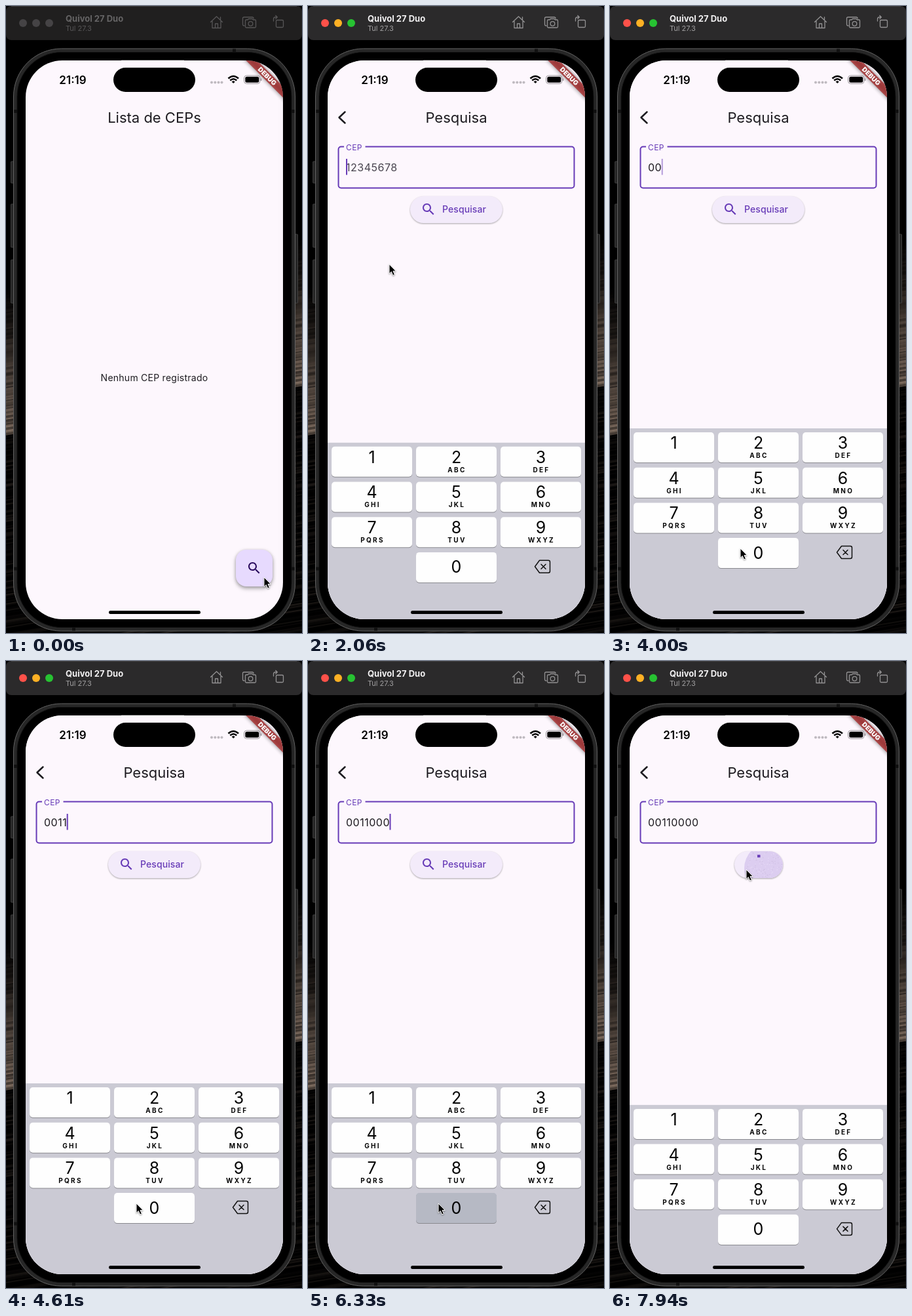
These frames come from a looping animation (452x956 px, 8000 ms). An HTML page:

```html
<!DOCTYPE html>
<html lang="pt">
<head>
<meta charset="utf-8">
<title>Pesquisa de CEP</title>
<style>
html, body { margin: 0; width: 100%; height: 100%; overflow: hidden; background: #000; }
svg { display: block; width: 100vw; height: 100vh; font-family: Inter, Roboto, sans-serif; }
.mid { text-anchor: middle; }
.title { font-size: 22px; fill: #1d1b20; }
.line { fill: none; stroke-linecap: round; stroke-linejoin: round; }
.bar { fill: #201f1f; }
.dot { fill: #454345; }
.name { fill: #656465; font-size: 13px; font-weight: 700; }
.sub { fill: #565556; font-size: 11px; }
.tools { stroke: #565556; stroke-width: 1.3; }
.active .bar { fill: #2b2a2b; }
.active .dot { fill: var(--on); }
.active .name { fill: #f2f1f2; }
.active .sub { fill: #a09fa0; }
.active .tools { stroke: #929192; }
.field { font-size: 16px; letter-spacing: .5px; }
.digit { font-size: 25px; fill: #050505; }
.letters { font-size: 10px; font-weight: 700; letter-spacing: 2.3px; fill: #050505; }
.raised { filter: drop-shadow(0 1px 1px #0005); }
.fab { filter: drop-shadow(0 3px 3px #0004) drop-shadow(0 1px 2px #0003); }
</style>
</head>
<body>
<svg viewBox="0 0 452 956" preserveAspectRatio="none">
  <defs>
    <clipPath id="screen"><rect x="30" y="83" width="393" height="852" rx="56"/></clipPath>
    <clipPath id="pill"><rect id="pillShape" y="290" height="41" rx="20.5"/></clipPath>
    <path id="lens" d="M15.5 14h-.79l-.28-.27C15.41 12.59 16 11.11 16 9.5 16 5.91 13.09 3 9.5 3S3 5.91 3 9.5 5.91 16 9.5 16c1.61 0 3.09-.59 4.23-1.57l.27.28v.79l5 4.99L20.49 19l-4.99-5zm-6 0C7.01 14 5 11.99 5 9.5S7.01 5 9.5 5 14 7.01 14 9.5 11.99 14 9.5 14z"/>
  </defs>

  <rect width="452" height="956"/>
  <g id="wallpaper" stroke-width="2.4"></g>

  <g id="window">
    <rect width="452" height="52" fill="#000"/>
    <rect class="bar" width="452" height="52" rx="8"/>
    <path d="M8 .5H444" stroke="#484748" opacity=".7"/>
    <circle class="dot" cx="26" cy="26" r="6" style="--on:#fe5149"/>
    <circle class="dot" cx="46" cy="26" r="6" style="--on:#fdb024"/>
    <circle class="dot" cx="66" cy="26" r="6" style="--on:#27c232"/>
    <text class="name" x="91" y="24">Quivol 27 Duo</text>
    <text class="sub" x="91" y="38">Tul 27.3</text>
    <g class="line tools">
      <path d="M312.5 24.5L321.5 16L330.5 24.5M315 23V33.500H328V23M327.500 17V21M319.500 33V27H323.500V33"/>
      <path d="M364 30H363Q361.500 30 361.500 28V19Q361.500 17 363.500 17H376Q378 17 378 19"/>
      <path d="M367 21H369L370.500 19.500H376L377.500 21H380Q381.500 21 381.500 22.500V31.500Q381.500 33 380 33H367Q365.500 33 365.500 31.500V22.500Q365.500 21 367 21Z"/>
      <circle cx="373.500" cy="27" r="3.300"/>
      <rect x="412.500" y="21.500" width="11" height="11" rx="1.500"/>
      <path d="M408.500 23V20Q408.500 17 411.500 17H414M411.800 14.500L414.300 17L411.800 19.500"/>
    </g>
  </g>

  <g fill="#252525" stroke="#484848" stroke-width=".8">
    <rect x="7.500" y="237" width="6" height="33" rx="1"/>
    <rect x="7.500" y="302" width="6" height="66" rx="1"/>
    <rect x="7.500" y="387" width="6" height="66" rx="1"/>
    <rect x="439.500" y="348" width="6" height="105" rx="1"/>
  </g>
  <rect x="11.500" y="65" width="430" height="888" rx="73" fill="#272727" stroke="#626262"/>
  <path d="M12 160.500H18M435 160.500H441M12 858H18M435 858H441M348.500 65.500V71M103.500 947V952.500" stroke="#111" stroke-width="5"/>
  <rect x="17" y="70.500" width="419" height="877" rx="68" fill="#000" stroke="#111"/>
  <path d="M176 82.500H272" stroke="#555"/>

  <g clip-path="url(#screen)">
    <rect x="30" y="83" width="393" height="852" fill="#fdf7fd"/>

    <g id="listPage">
      <text class="title mid" x="226.500" y="178">Lista de CEPs</text>
      <text class="mid" x="226.500" y="572" font-size="14" letter-spacing=".25" fill="#1d1b20">Nenhum CEP registrado</text>
      <rect class="fab" x="351" y="829" width="56" height="56" rx="16" fill="#e7dafe"/>
      <use href="#lens" x="367" y="845" fill="#2a0a5e"/>
    </g>

    <g id="searchPage">
      <rect x="30" y="83" width="393" height="852" fill="#fdf7fd" style="filter:drop-shadow(-3px 0 6px #0002)"/>
      <path class="line" d="M56.500 161.500L47.500 170L56.500 178.500" stroke="#1d1b20" stroke-width="2.500"/>
      <text class="title mid" x="226.500" y="178">Pesquisa</text>
      <rect id="border" x="46.500" y="214.500" width="360" height="63" rx="4" fill="none"/>
      <rect id="gap" x="55" y="211" height="7" fill="#fdf7fd"/>
      <text id="label" class="field">CEP</text>
      <text id="hint" class="field" x="58" y="252" fill="#49454f">12345678</text>
      <text id="typed" class="field" x="58" y="252" fill="#1d1b20"></text>
      <rect id="caret" y="233" width="2" height="24.500" fill="#673bb7"/>

      <g class="raised"><g clip-path="url(#pill)">
        <rect x="150" y="290" width="152" height="41" fill="#f3ebfa"/>
        <g id="ripple" fill="#dccdf0"><circle/></g>
      </g></g>
      <g id="buttonLabel" fill="#673bb7">
        <use href="#lens" x="172" y="298"/>
        <text x="205" y="315" font-size="14" font-weight="500" letter-spacing=".1">Pesquisar</text>
      </g>
      <rect id="spinner" x="225" y="295.500" width="4.500" height="4" rx=".5" fill="#673bb7"/>
    </g>

    <g id="keyboard">
      <rect x="30" y="644" width="393" height="330" fill="#cbcad4"/>
      <g id="keys"></g>
      <path class="line" d="M353.500 823.500H367Q369.500 823.500 369.500 826V840Q369.500 842.500 367 842.500H353.500L346.500 833ZM356 829.500L363 836.500M363 829.500L356 836.500" stroke="#111" stroke-width="1.500"/>
    </g>

    <text class="mid" x="102" y="118.500" font-size="17" font-weight="600">21:19</text>
    <rect x="164" y="94" width="125" height="37" rx="18.500"/>
    <g fill="#bfbac0">
      <circle cx="314" cy="116.500" r="2"/><circle cx="319.300" cy="116.500" r="2"/>
      <circle cx="324.500" cy="116.500" r="2"/><circle cx="329.500" cy="116.500" r="2"/>
    </g>
    <g fill="none" stroke="#000" stroke-width="2.600">
      <path d="M339.500 110.500Q347.200 103.500 355 110.500M342.300 113.500Q347.200 109 352.200 113.500"/>
      <path d="M347.200 117.500L345.200 115.500Q347.200 113.800 349.200 115.500Z" fill="#000" stroke-width="1"/>
    </g>
    <rect x="363.500" y="106" width="24.500" height="12.500" rx="4" fill="none" stroke="#9b969b"/>
    <rect x="365.300" y="107.800" width="21" height="9" rx="2.500"/>
    <path d="M389.500 110.500V114" stroke="#9b969b" stroke-width="1.500"/>
    <rect x="157" y="922" width="140" height="5" rx="2.500"/>

    <g transform="translate(423 83) rotate(45)">
      <rect x="-60" y="28" width="120" height="12" fill="#000" opacity=".5" style="filter:blur(3px)"/>
      <rect x="-60" y="28" width="120" height="12" fill="#000" opacity=".15"/>
      <rect x="-60" y="28" width="120" height="12" fill="#b71c1c" opacity=".63"/>
      <text class="mid" x="0" y="37.600" font-size="10" font-weight="900" fill="#fff">DEBUG</text>
    </g>
  </g>

  <path id="pointer" d="M0 0V14.500L3.300 11.500L5.700 17L8.400 15.800L6 10.500H10.300Z" fill="#000" stroke="#fff" stroke-width="1" style="filter:drop-shadow(0 1px 1px #0006)"/>
</svg>

<script>
const LOOP = 8000;
const ENTRY = '00110000';
const PRESSES = [2640, 3400, 4060, 4350, 5230, 6050, 6320, 6660];
const FOCUS = 1780, SUBMIT = 7720, LOADING = 7900;

// Pointer stops: time, x, y
const STOPS = [
  [0, 394, 871], [400, 394, 871], [1390, 99, 250], [1850, 99, 250],
  [2500, 200, 830], [2650, 200, 830], [3300, 110, 672], [3500, 110, 672],
  [3900, 199, 827], [4650, 199, 827], [5100, 125, 679], [5450, 125, 679],
  [5950, 199, 827], [6760, 199, 827], [7363, 200, 320], [7600, 208, 318], [LOOP, 208, 318]
];

const $ = id => document.getElementById(id);
const set = (el, attrs) => { for (const k in attrs) el.setAttribute(k, attrs[k]); };
const ramp = (t, from, duration) => Math.min(1, Math.max(0, (t - from) / duration));
const smooth = p => p * p * (3 - 2 * p);
const easeOut = p => 1 - (1 - p) ** 4;
const mix = (a, b, p) => a + (b - a) * p;

let seed = 7;
const random = () => (seed = seed * 16807 % 2147483647) / 2147483647;

function buildWallpaper() {
  let lines = '';
  for (let y = 0; y < 1040; y += 2) {
    const glow = y < 430 || y > 655 ? 0 : (y - 430) / 225;
    const light = glow * 46 * (.45 + .55 * random()) + (y > 655 ? 10 * random() ** 3 : 0);
    lines += `<path d="M0 ${y}L452 ${y - 75}" stroke="hsl(25 14% ${light.toFixed(1)}%)"/>`;
  }
  $('wallpaper').innerHTML = lines;
}

const keys = [];
function buildKeys() {
  const letters = ['', 'ABC', 'DEF', 'GHI', 'JKL', 'MNO', 'PQRS', 'TUV', 'WXYZ'];
  let html = '';
  for (let i = 0; i < 10; i++) {
    const x = 36 + (i === 9 ? 1 : i % 3) * 129;
    const y = 650 + Math.floor(i / 3) * 53.7;
    const cx = x + 61.5;
    keys.push({ x, y });
    html += `<rect x="${x}" y="${y + 1}" width="123" height="46" rx="5" fill="#89898f"/>
      <rect class="cap" x="${x}" y="${y}" width="123" height="46" rx="5"/>
      <text class="digit mid" x="${cx}" y="${y + (i === 9 ? 31.5 : 25)}">${(i + 1) % 10}</text>
      <text class="letters mid" x="${cx + 1}" y="${y + 39}">${letters[i] || ''}</text>`;
  }
  $('keys').innerHTML = html;
}

function buildRipple() {
  let specks = '';
  for (let i = 0; i < 260; i++) {
    const r = 37 * Math.sqrt(random()), a = random() * 2 * Math.PI;
    const shade = random() < .5 ? '#cfc0e2' : '#e6daf5';
    specks += `<rect x="${(r * Math.cos(a)).toFixed(1)}" y="${(r * Math.sin(a)).toFixed(1)}" width="1.2" height="1.2" fill="${shade}"/>`;
  }
  $('ripple').innerHTML = '<circle r="38"/>' + specks;
}

function pointerAt(t) {
  const i = STOPS.findIndex(stop => stop[0] > t);
  const [t0, x0, y0] = STOPS[i - 1], [t1, x1, y1] = STOPS[i];
  const p = smooth((t - t0) / (t1 - t0));
  return [mix(x0, x1, p), mix(y0, y1, p)];
}

function drawField(t) {
  const focused = t >= FOCUS;
  const float = smooth(ramp(t, FOCUS, 167));
  const purple = '#673bb7';
  set($('border'), { stroke: focused ? purple : '#7b747e', 'stroke-width': focused ? 2 : 1 });
  set($('gap'), { width: 32.5 * float });
  set($('label'), {
    transform: `translate(58 ${mix(252, 220, float)}) scale(${mix(1, .75, float)})`,
    fill: focused ? purple : '#49454f'
  });
  set($('hint'), { opacity: float * (1 - ramp(t, PRESSES[0], 240)) });

  const count = PRESSES.filter(time => time <= t).length;
  const typed = $('typed');
  typed.textContent = ENTRY.slice(0, count);
  const phase = (t - (PRESSES[count - 1] || FOCUS)) % 1000;
  const blink = 1 - ramp(phase, 500, 200) + ramp(phase, 900, 100);
  set($('caret'), {
    x: 58 + (count ? typed.getComputedTextLength() - .5 : 0),
    opacity: focused && t < SUBMIT + 60 ? blink : 0
  });
}

function drawButton(t) {
  const loading = t >= LOADING;
  set($('pillShape'), { x: loading ? 190 : 156, width: loading ? 74 : 141 });
  set($('buttonLabel'), { opacity: loading ? 0 : 1 });
  set($('spinner'), { opacity: loading ? 1 : 0 });
  const grow = ramp(t, SUBMIT, 220);
  set($('ripple'), {
    transform: `translate(${loading ? 243 : 209} 316) scale(${grow})`,
    opacity: Math.min(1, grow * 2)
  });
}

function drawKeyboard(t) {
  const rise = easeOut(ramp(t, FOCUS + 80, 420));
  const fall = smooth(ramp(t, 7860, 390));
  set($('keyboard'), { transform: `translate(0 ${295 * (1 - rise + fall)})` });

  const press = PRESSES.find(time => t >= time && t < time + 130);
  const [px, py] = press ? pointerAt(press) : [0, 0];
  document.querySelectorAll('.cap').forEach((cap, i) => {
    const { x, y } = keys[i];
    const hit = px > x && px < x + 123 && py > y && py < y + 46;
    set(cap, { fill: hit ? '#b6b9c4' : '#fefefe' });
  });
}

function draw(t) {
  set($('window'), { class: t >= 60 ? 'active' : '' });
  const push = easeOut(ramp(t, 150, 520));
  set($('listPage'), { transform: `translate(${-131 * push} 0)` });
  set($('searchPage'), { transform: `translate(${400 * (1 - push)} 0)` });
  drawField(t);
  drawButton(t);
  drawKeyboard(t);
  set($('pointer'), { transform: `translate(${pointerAt(t)})` });
}

buildWallpaper();
buildKeys();
buildRipple();
const start = performance.now();
function tick() {
  draw((performance.now() - start) % LOOP);
  requestAnimationFrame(tick);
}
tick();
</script>
</body>
</html>
```
